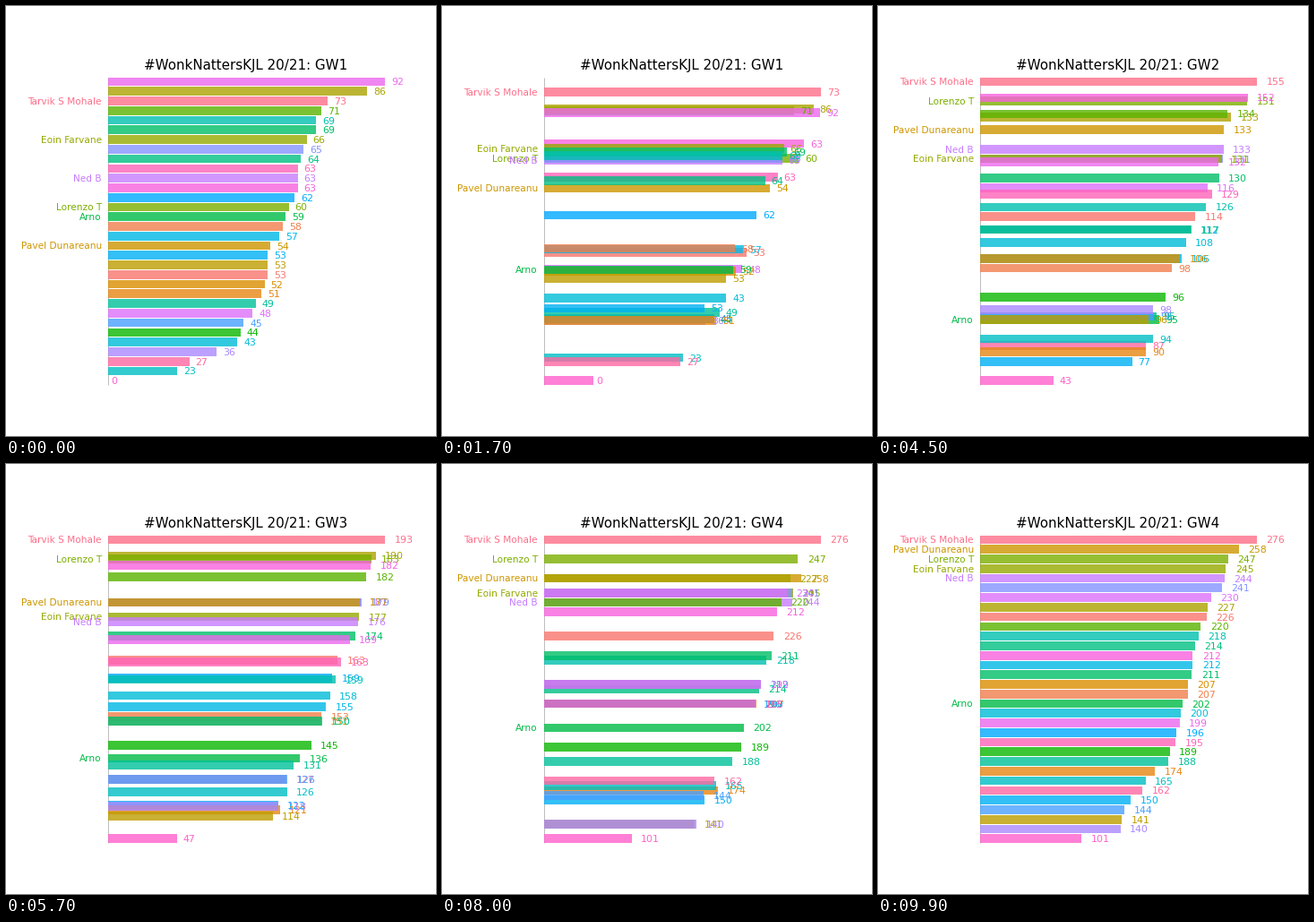
A matplotlib script for the animation above (10 s loop, 480x480 px).

```python
import numpy as np
import matplotlib.pyplot as plt
from matplotlib.animation import FuncAnimation
from matplotlib.patches import Rectangle

SIZE, DPI = 480, 100
FRAMES, INTERVAL = 100, 100
X0, WIDTH = 114, 309
TOP, PITCH = 84.5, 10.765
HOLD, CYCLE, MOVE = 6, 31, 24

plt.rcParams["font.family"] = "DejaVu Sans"

# Cumulative points after each game week, one row per hue step
SCORES = np.array([
    (53, 114, 163, 226), (58, 98, 153, 207), (51, 90, 121, 174), (52, 106, 151, 207),
    (54, 133, 177, 258), (53, 96, 114, 141), (86, 133, 190, 227), (66, 131, 177, 245),
    (60, 151, 183, 247), (71, 134, 182, 220), (44, 96, 145, 189), (59, 95, 136, 202),
    (69, 130, 174, 211), (64, 117, 150, 214), (49, 95, 131, 188), (69, 126, 159, 218),
    (23, 94, 126, 165), (43, 108, 158, 200), (57, 106, 155, 212), (53, 77, 122, 150),
    (62, 112, 159, 196), (45, 95, 126, 144), (65, 131, 179, 241), (36, 98, 118, 140),
    (63, 133, 176, 244), (48, 116, 181, 230), (92, 132, 169, 199), (63, 152, 182, 212),
    (0, 43, 47, 101), (63, 129, 163, 195), (27, 87, 127, 162), (73, 155, 193, 276),
])
N = len(SCORES)

# Who comes first when points are level
TIE_ORDER = [19, 5, 0, 29, 4, 6, 24, 27, 9, 7, 22, 3, 18, 1, 23, 10,
             21, 14, 11, 16, 20, 15, 12, 2, 8, 13, 17, 25, 26, 28, 30, 31]

NAMES = {4: "Pavel Dunareanu", 7: "Eoin Farvane", 8: "Lorenzo T",
         11: "Arno", 24: "Ned B", 31: "Tarvik S Mohale"}


def hcl(hue, chroma=100, lum=65):
    """Polar CIE-LUV colour as an sRGB triple."""
    a = np.radians(hue)
    y = ((lum + 16) / 116) ** 3
    u = chroma * np.cos(a) / (13 * lum) + 0.1978
    v = chroma * np.sin(a) / (13 * lum) + 0.4683
    x = 9 * y * u / (4 * v)
    z = -x / 3 - 5 * y + 3 * y / v
    rgb = np.array([
        3.2405 * x - 1.5371 * y - 0.4985 * z,
        -0.9693 * x + 1.8760 * y + 0.0416 * z,
        0.0556 * x - 0.2040 * y + 1.0572 * z,
    ])
    rgb = np.clip(rgb, 0, 1)
    return tuple(np.clip(np.where(rgb > 0.00304,
                                  1.055 * rgb ** (1 / 2.4) - 0.055,
                                  12.92 * rgb), 0, 1))


def rank_all(week):
    ranks = np.empty(N)
    for place, i in enumerate(sorted(TIE_ORDER, key=lambda i: -SCORES[i, week])):
        ranks[i] = place
    return ranks


def px(size):
    return size * 72 / DPI


RANKS = np.array([rank_all(w) for w in range(SCORES.shape[1])])
COLORS = [hcl(15 + 360 * i / N) for i in range(N)]

fig = plt.figure(figsize=(SIZE / DPI, SIZE / DPI), dpi=DPI, facecolor="white")
ax = fig.add_axes([0, 0, 1, 1])
ax.set_xlim(0, SIZE)
ax.set_ylim(SIZE, 0)
ax.axis("off")

ax.plot([113.5, 113.5], [80, 423], color="#bebebe", lw=px(1),
        solid_capstyle="butt", zorder=1)
title = ax.text(267.8, 71, "", fontsize=px(15.1), ha="center", color="black")

BAR_H = 0.9 * PITCH
bars, values, names = [], [], {}
for i, color in enumerate(COLORS):
    bars.append(ax.add_patch(Rectangle((X0, 0), 0, BAR_H, fc=color, ec="none", alpha=0.8)))
    values.append(ax.text(0, 0, "", fontsize=px(11), color=color))
    if i in NAMES:
        names[i] = ax.text(107, 0, NAMES[i], fontsize=px(10.5), ha="right",
                           color=color, zorder=100)


def update(frame):
    week = int(np.clip((frame - HOLD) // CYCLE, 0, 2))
    p = np.clip((frame - HOLD - CYCLE * week) / MOVE, 0, 1)
    shown = week + int(p >= 0.5)

    points = (1 - p) * SCORES[:, week] + p * SCORES[:, week + 1]
    rows = (1 - p) * RANKS[week] + p * RANKS[week + 1]
    lengths = WIDTH * points / points.max()
    ys = TOP + PITCH * rows

    for i in range(N):
        depth = N - RANKS[week, i]
        bars[i].set_y(ys[i] - BAR_H / 2)
        bars[i].set_width(lengths[i])
        bars[i].set_zorder(2 + depth)
        label = str(SCORES[i, shown])
        values[i].set_text(label)
        # gap of half the label's own width
        values[i].set_position((X0 + lengths[i] + 3.5 * len(label), ys[i] + 4))
        values[i].set_zorder(50 + depth)
    for i, text in names.items():
        text.set_y(ys[i] + 3.8)
    title.set_text(f"#WonkNattersKJL 20/21: GW{shown + 1}")
    return bars + values + list(names.values()) + [title]


anim = FuncAnimation(fig, update, frames=FRAMES, interval=INTERVAL,
                     repeat=True, repeat_delay=0, blit=False)
plt.show()
```
